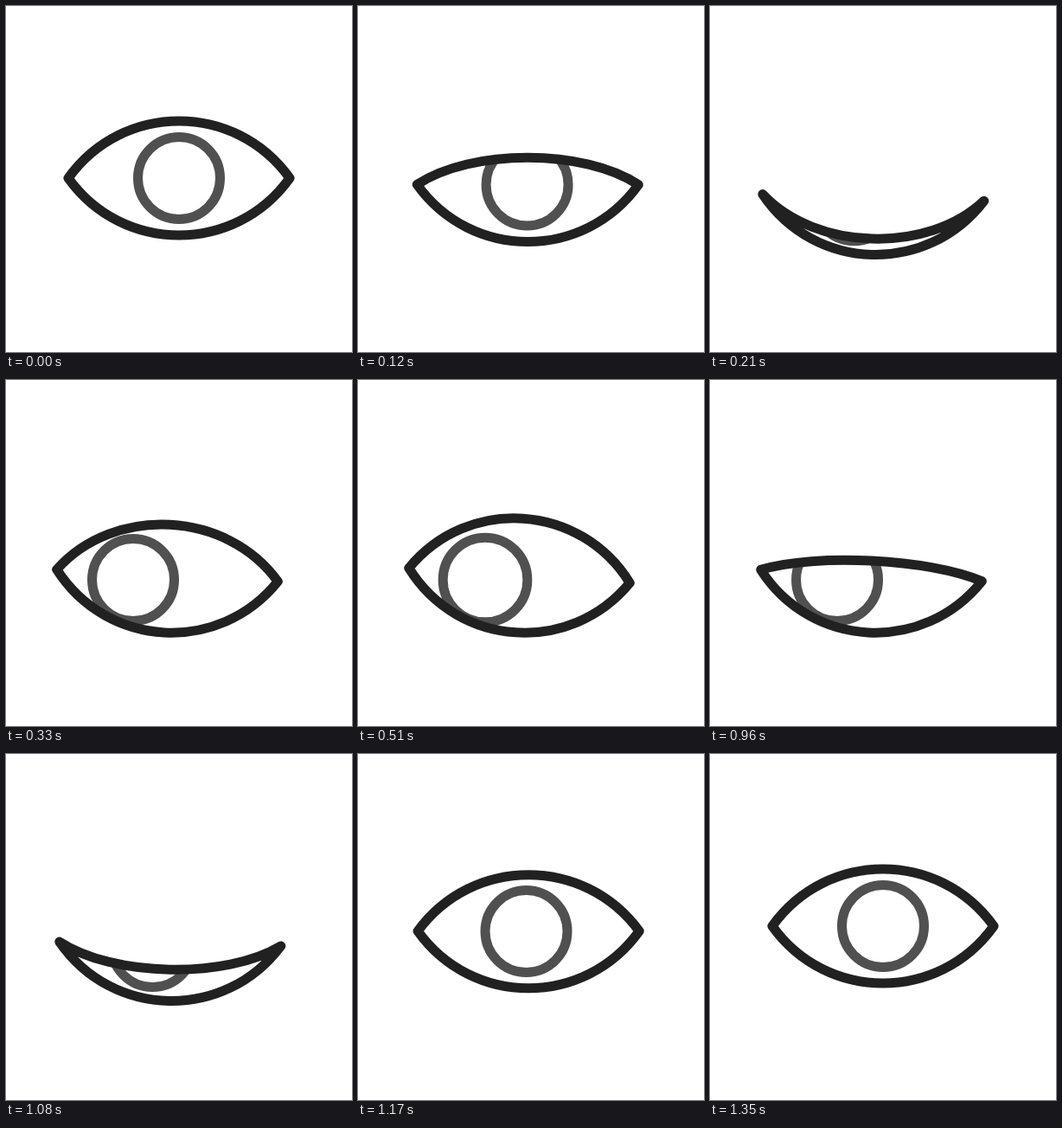
An HTML page with a canvas that plays this animation: 400 by 400 pixels, repeating every 1410 ms.

```html
<!DOCTYPE html>
<html lang="en">
<head>
<meta charset="utf-8">
<title>Blinking eye</title>
<style>
  html, body { margin: 0; width: 100%; height: 100%; overflow: hidden; background: #fff; }
  canvas { display: block; width: 400px; height: 400px; }
</style>
</head>
<body>
<canvas id="eye"></canvas>
<script>
const LOOP = 1410, STEP = 30, SIZE = 400;
const HALF = 128, HANDLE = 65, ARCH = 66, STROKE = 11;

// Eased 0 to 1 between two times.
function ramp(t, from, to) {
  const u = Math.min(1, Math.max(0, (t - from) / (to - from)));
  return u * u * (3 - 2 * u);
}

// Rises to 1, stays, and falls back to 0.
const hold = (t, in0, in1, out0, out1) => ramp(t, in0, in1) - ramp(t, out0, out1);
const bump = (t, mid, reach) => hold(t, mid - reach, mid, mid, mid + reach);
const blink = (t, start) => hold(t, start, start + 150, start + 155, start + 285);

function pose(t) {
  const windUp = bump(t, 35, 35);
  const widen = bump(t, 840, 60);
  const settle = bump(t, 1270, 80);
  const focus = bump(t, 645, 315);
  const blinks = blink(t, 65) + blink(t, 892);
  return {
    shift: hold(t, 40, 270, 1005, 1240) - .07 * windUp - .14 * settle,
    gaze: hold(t, 105, 300, 955, 1210),
    tilt: (3.1 * hold(t, 105, 300, 930, 1180) + 1.2 * focus) * Math.PI / 180,
    radius: 47.5 + 2.2 * focus,
    lid: ARCH - 114 * blinks + 5 * windUp + 4.5 * widen + 2 * settle
  };
}

const canvas = document.getElementById("eye");
const ctx = canvas.getContext("2d");
const dpr = window.devicePixelRatio || 1;
canvas.width = canvas.height = SIZE * dpr;

function outline(lid) {
  const path = new Path2D();
  const up = -lid * 4 / 3, down = ARCH * 4 / 3;
  path.moveTo(-HALF, 0);
  path.bezierCurveTo(-HANDLE, up, HANDLE, up, HALF, 0);
  path.bezierCurveTo(HANDLE, down, -HANDLE, down, -HALF, 0);
  path.closePath();
  return path;
}

function draw(t) {
  const { shift, gaze, tilt, radius, lid } = pose(t);
  const shape = outline(lid);

  ctx.setTransform(dpr, 0, 0, dpr, 0, 0);
  ctx.fillStyle = "#fff";
  ctx.fillRect(0, 0, SIZE, SIZE);
  ctx.translate(200 - 13.5 * shift, 199 + 27 * shift);
  ctx.rotate(tilt);
  ctx.lineJoin = "round";
  ctx.lineWidth = STROKE;

  ctx.save();
  ctx.clip(shape);
  ctx.rotate(-tilt);
  ctx.beginPath();
  ctx.arc(-39.5 * gaze, 5 * gaze, radius, 0, Math.PI * 2);
  ctx.strokeStyle = "#505050";
  ctx.stroke();
  ctx.restore();

  ctx.strokeStyle = "#212121";
  ctx.stroke(shape);
}

const start = performance.now();
function tick() {
  const t = (performance.now() - start) % LOOP;
  draw(Math.floor(t / STEP) * STEP);
  requestAnimationFrame(tick);
}
tick();
</script>
</body>
</html>
```
